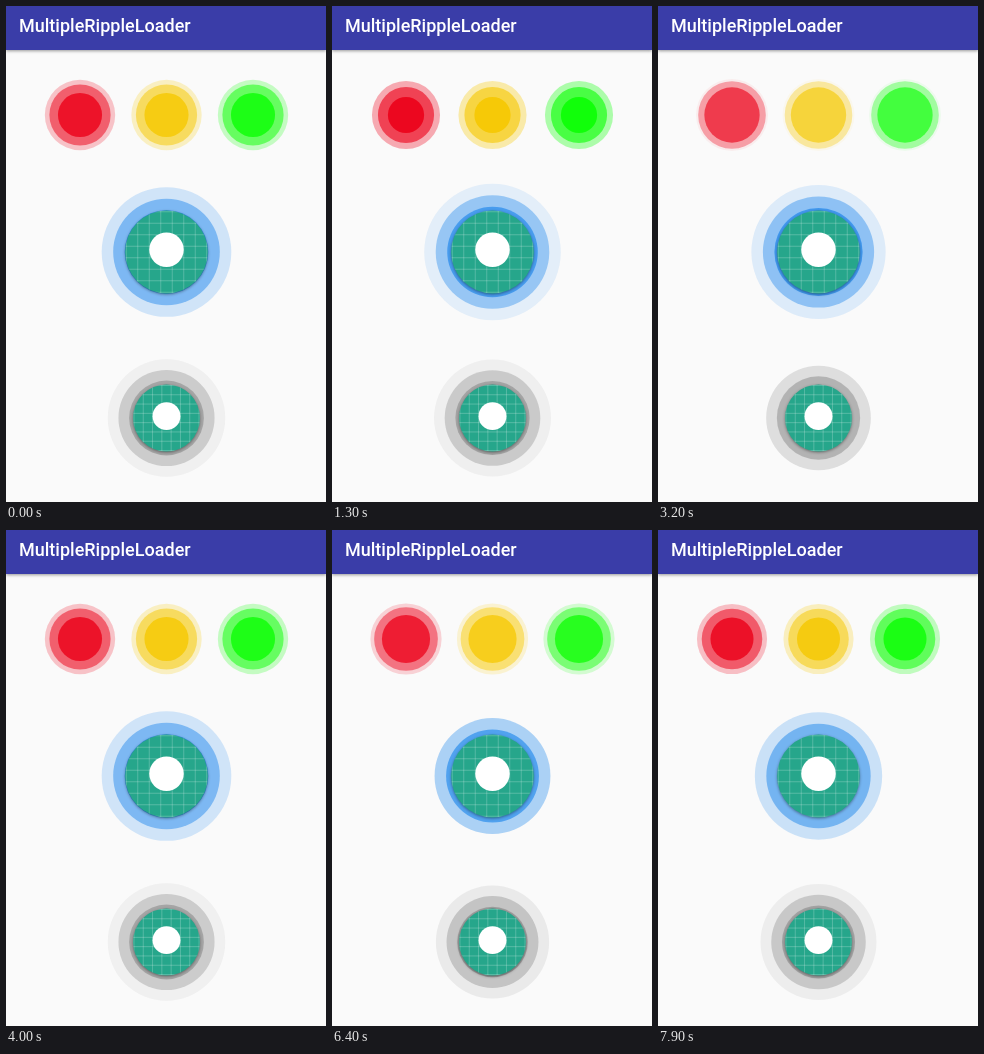
Recreate the animation shown at these times as an HTML page with a canvas. Size 320x496 px, loop 8000 ms.

```html
<!DOCTYPE html>
<html lang="en">
<head>
<meta charset="utf-8">
<title>MultipleRippleLoader</title>
<style>
  html, body { margin: 0; width: 100%; height: 100%; overflow: hidden; background: #fafafa; }
  canvas { position: absolute; left: 0; top: 0; width: 320px; height: 496px; }
  header {
    position: absolute; left: 0; top: 0; width: 320px; height: 44px;
    box-sizing: border-box; padding-left: 13px;
    background: #3a3da8; color: #fff;
    font: 500 18px/40px Roboto, "Noto Sans", sans-serif;
    white-space: nowrap;
    box-shadow: 0 1px 3px rgba(0, 0, 0, .4);
  }
</style>
</head>
<body>
<canvas id="stage" width="320" height="496"></canvas>
<header>MultipleRippleLoader</header>
<script>
const LOOP = 8000, STEP = 100, RIPPLES = 3;
const canvas = document.getElementById('stage');
const ctx = canvas.getContext('2d');
const ratio = Math.max(1, window.devicePixelRatio || 1);
canvas.width = 320 * ratio;
canvas.height = 496 * ratio;

const linear = t => t;
const decelerate = t => 1 - (1 - t) * (1 - t);

const light = (x, color) => ({
  x, y: 109, color, from: 18, to: 36, duration: 6000, phase: 0.36,
  alpha: [0.9, 0.04], ease: decelerate
});

// phase counts in ripple intervals at time zero
const loaders = [
  light(74, '#ec0019'),
  light(160.5, '#f6c800'),
  light(247, '#0cff04'),
  { x: 160.5, y: 246, color: '#2188ec', from: 34, to: 68.5, duration: 3000, phase: 0.68,
    alpha: [0.95, 0.1], ease: linear, icon: 1.15 },
  { x: 160.5, y: 412, color: '#919191', from: 28, to: 60, duration: 4000, phase: 0.88,
    alpha: [0.9, 0.07], ease: linear, icon: 0.93 }
];

function disc(x, y, r, color) {
  ctx.fillStyle = color;
  ctx.beginPath();
  ctx.arc(x, y, r, 0, Math.PI * 2);
  ctx.fill();
}

function drawRipples(l, time) {
  for (let i = 0; i < RIPPLES; i++) {
    const t = (time / l.duration + (l.phase + i) / RIPPLES) % 1;
    ctx.globalAlpha = l.alpha[0] + (l.alpha[1] - l.alpha[0]) * t;
    disc(l.x, l.y, l.from + (l.to - l.from) * l.ease(t), l.color);
  }
  ctx.globalAlpha = 1;
}

function drawIcon(x, y, unit) {
  const r = 36 * unit;
  ctx.save();
  ctx.shadowColor = 'rgba(0,0,0,.4)';
  ctx.shadowBlur = 3 * ratio;
  ctx.shadowOffsetY = ratio;
  disc(x, y, r, '#26a68b');
  ctx.restore();

  ctx.save();
  ctx.beginPath();
  ctx.arc(x, y, r, 0, Math.PI * 2);
  ctx.clip();
  ctx.strokeStyle = 'rgba(255,255,255,.25)';
  ctx.lineWidth = 0.9;
  ctx.beginPath();
  for (let d = -35; d <= 35; d += 10) {
    const o = d * unit;
    ctx.moveTo(x + o, y - r);
    ctx.lineTo(x + o, y + r);
    ctx.moveTo(x - r, y + o);
    ctx.lineTo(x + r, y + o);
  }
  ctx.stroke();
  ctx.restore();

  disc(x, y - 2 * unit, 15 * unit, '#fff');
}

function draw(time) {
  ctx.setTransform(ratio, 0, 0, ratio, 0, 0);
  ctx.fillStyle = '#fafafa';
  ctx.fillRect(0, 0, 320, 496);
  for (const l of loaders) {
    drawRipples(l, time);
    if (l.icon) drawIcon(l.x, l.y, l.icon);
  }
}

const start = performance.now();
function tick() {
  const time = (performance.now() - start) % LOOP;
  draw(Math.floor(time / STEP) * STEP);
  requestAnimationFrame(tick);
}
tick();
</script>
</body>
</html>
```
